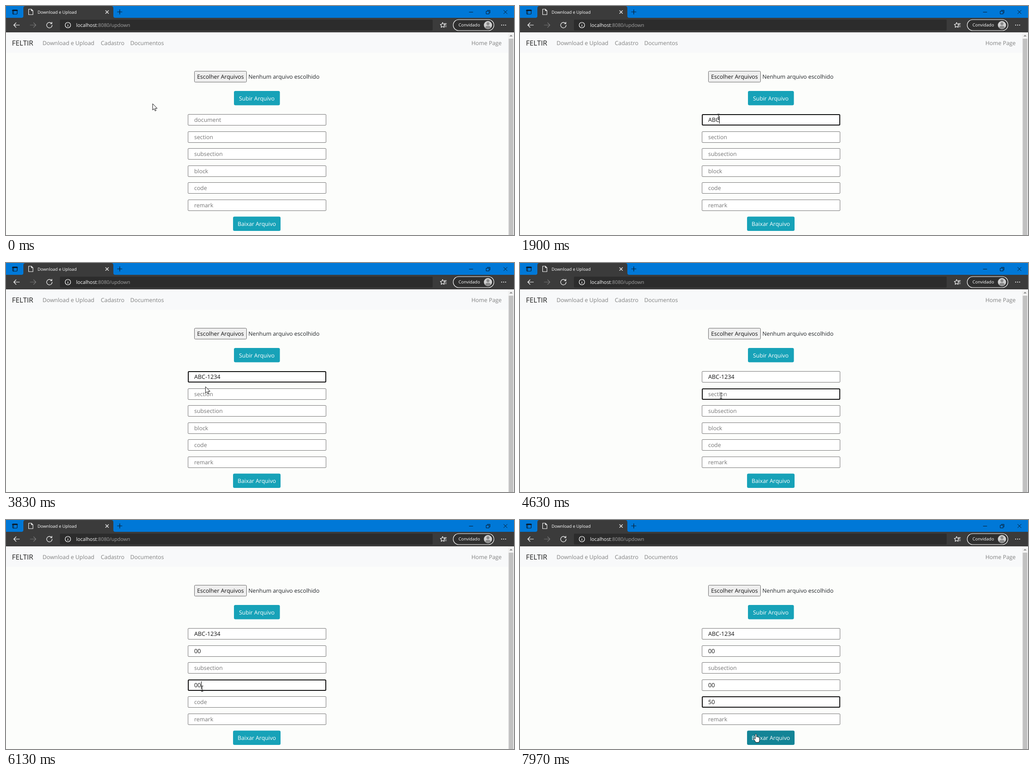
An HTML page for the animation above (8000 ms loop, 1112x504 px).

```html
<!DOCTYPE html>
<html lang="pt">
<head>
<meta charset="utf-8">
<title>Download e Upload</title>
<style>
html, body { margin: 0; width: 100%; height: 100%; overflow: hidden; background: #fcfdfb; }
svg { display: block; }
text { font-family: "Open Sans", "Noto Sans", sans-serif; font-size: 12.36px; text-rendering: geometricPrecision; white-space: pre; }
.line { fill: none; stroke-linecap: round; stroke-linejoin: round; }
.nav { fill: #808181; }
.btn { fill: #17a2b8; }
.btn.hover { fill: #138496; }
.box { fill: #fff; stroke: #767676; }
.box.hover { stroke: #4f4f4f; }
.box.focus { stroke: #101010; stroke-width: 2; }
.hint { fill: #757575; }
.typed { fill: #111; font-size: 12.7px; }
</style>
</head>
<body>
<svg id="stage" width="1112" height="504" viewBox="0 0 1112 504">
  <!-- Title bar -->
  <rect width="1112" height="26" fill="#0078d7"/>
  <rect y="26" width="1112" height="32" fill="#3b3b3b"/>
  <path d="M34 26Q38 26 38 22V5Q38 0 43 0H230Q235 0 235 5V22Q235 26 239 26Z" fill="#3b3b3b"/>
  <g class="line" stroke="#0a1a2a" stroke-width="1.2">
    <rect x="14.5" y="8.5" width="10" height="9.5" rx="1.5"/>
    <path d="M14.5 9.7H24.5" stroke-width="2.6"/>
    <path d="M16.6 11V18" stroke-width="1"/>
    <path d="M244 13H254M249 8V18"/>
    <path d="M1014 13.5H1022M1089.5 9.5L1097 17M1097 9.5L1089.5 17" stroke-width="1"/>
    <path d="M1051.5 11.5H1057.5V17.5H1051.5ZM1053.5 9.5H1059.5V15.5" stroke-width="1"/>
  </g>
  <g class="line" stroke="#fff" stroke-width="1.1">
    <path d="M49.5 7H55.5L59 10.5V19H49.5ZM55.5 7V10.5H59"/>
    <path d="M218 10L224.500 16.500M224.500 10L218 16.500"/>
  </g>
  <text x="69" y="16.7" fill="#fff" style="font-size:9.35px">Download e Upload</text>

  <!-- Address bar -->
  <rect x="118" y="30" width="816" height="24" rx="2" fill="#2c2c2c"/>
  <g class="line" stroke="#fff" stroke-width="1.2">
    <path d="M29.500 42H17M22 37L17 42L22 47"/>
    <path d="M53 42H65.500M60.500 37L65.500 42L60.500 47" stroke="#777"/>
    <path d="M99.500 38.200A6 6 0 1 0 101 42M100.500 35.500V39H97"/>
    <circle cx="135.500" cy="42" r="6"/>
    <path d="M135.500 41.500V45M135.500 39V39.100"/>
    <path d="M959.500 42.500L957.600 44.800L958 48L954.600 46.200L951.500 48L952.100 44.200L949.700 41.600L953 41L954.700 37.300L956.500 41L960 41.400" transform="translate(1 -1)"/>
    <path d="M959.500 38.700H964M961 42H964M960.500 45.500H964"/>
    <rect x="979" y="30" width="89" height="24" rx="12" fill="#2f2f2f"/>
  </g>
  <text x="153.500" y="45.800" fill="#a3a3a3" style="font-size:10.83px"><tspan fill="#fff">localhost</tspan>:8080/updown</text>
  <text x="990.500" y="45.300" fill="#fff" style="font-size:9.45px">Convidado</text>
  <circle cx="1055" cy="42" r="9" fill="#cfcfcf"/>
  <circle cx="1055" cy="39" r="3.300" fill="#8a8a8a"/>
  <path d="M1049 48Q1049 43.500 1055 43.500T1061 48Q1055 52.500 1049 48Z" fill="#8a8a8a"/>
  <g fill="#fff"><circle cx="1085" cy="42" r="1.100"/><circle cx="1089.300" cy="42" r="1.100"/><circle cx="1093.600" cy="42" r="1.100"/></g>

  <!-- Page -->
  <rect y="58" width="1099" height="45" fill="#f8f9fa"/>
  <rect x="1099" y="58" width="13" height="446" fill="#f1f1f1"/>
  <rect x="1100.500" y="72" width="10" height="432" fill="#c1c1c1"/>
  <path d="M1102 67L1105.500 63.500L1109 67Z" fill="#8a8a8a"/>
  <text x="13" y="87" fill="#1a1a1a" style="font-size:15.4px">FELTIR</text>
  <text class="nav" x="80" y="86">Download e Upload</text>
  <text class="nav" x="207.500" y="86">Cadastro</text>
  <text class="nav" x="272" y="86">Documentos</text>
  <text class="nav" x="1085" y="86" text-anchor="end">Home Page</text>

  <rect x="412.500" y="143.500" width="114" height="24" rx="2" fill="#efefef" stroke="#6b6b6b"/>
  <text x="469.500" y="160.200" text-anchor="middle" fill="#111">Escolher Arquivos</text>
  <text x="530.500" y="160.200" fill="#212529">Nenhum arquivo escolhido</text>
  <rect class="btn" x="499" y="187" width="100.500" height="31.500" rx="3.300"/>
  <text x="549" y="207.600" text-anchor="middle" fill="#fff">Subir Arquivo</text>
  <g id="form"></g>
  <rect class="btn" id="save" x="497" y="463.500" width="104" height="31.500" rx="3.300"/>
  <text x="549" y="484.300" text-anchor="middle" fill="#fff">Baixar Arquivo</text>

  <rect id="caret" width="1" height="17" fill="#000"/>
  <g id="pointer" stroke-linejoin="round">
    <path d="M0 0V14L3.200 11L5.400 16L7.600 15L5.500 10.300H9.900Z" fill="#fff" stroke="#111"/>
    <path d="M-2.500 -6H-.6L0 -5.400L.6 -6H2.500M0 -5.400V5.400M-2.500 6H-.6L0 5.400L.6 6H2.500" fill="none" stroke="#222" stroke-width="1.100"/>
    <path d="M-1.600 1.200C-1.600 -.8 1.400 -.8 1.400 1.200V6C1.600 5 4 5 4 6.600C4.200 5.800 6.200 6 6.200 7.400C6.600 6.800 8 7.200 8 8.600V12.500C8 15 6.500 16 6.500 18H-.5C-1 16 -4 12.500 -5.200 10.400C-5.600 8.800 -3.600 8.400 -1.600 10.600Z" fill="#fff" stroke="#111"/>
  </g>
</svg>
<script>
const LOOP = 8000, BLINK = 530, LEFT = 398, TEXT_X = 412;
const labels = ['document', 'section', 'subsection', 'block', 'code', 'remark'];

// Pointer stops: time, x, y
const path = [
  [0, 321, 215], [70, 321, 215], [310, 434.5, 244],
  [3700, 434.5, 244], [3920, 438, 288], [4400, 438, 288], [4570, 440, 292],
  [5200, 440, 292], [5470, 430.400, 365],
  [6070, 430.400, 365], [6300, 424.500, 401],
  [7530, 424.500, 401], [7965, 516.500, 471.500], [LOOP, 516.500, 471.500]
];

// Each entry focuses a field; its keys follow at the given times
const entries = [
  { field: 0, at: 340, text: 'ABC-1234', keys: [1570, 1770, 1900, 2570, 2770, 2970, 3100, 3300] },
  { field: 1, at: 4100, text: '00', keys: [4970, 5100] },
  { field: 3, at: 5630, text: '00', keys: [5870, 6000] },
  { field: 4, at: 6330, text: '50', keys: [7030, 7400] }
];

const $ = id => document.getElementById(id);
const form = $('form'), save = $('save'), caret = $('caret'), pointer = $('pointer');

function add(tag, attrs) {
  const el = document.createElementNS('http://www.w3.org/2000/svg', tag);
  for (const k in attrs) el.setAttribute(k, attrs[k]);
  return form.appendChild(el);
}

const fields = labels.map((label, i) => {
  const y = Math.round(238 + 37.6 * i);
  return {
    label, y,
    box: add('rect', { x: LEFT + .5, y: y + .5, width: 302, height: 24, rx: 1.5 }),
    text: add('text', { x: TEXT_X, y: y + 17.3 })
  };
});

function pointerAt(t) {
  const i = Math.max(1, path.findIndex(p => p[0] > t));
  const [t0, x0, y0] = path[i - 1], [t1, x1, y1] = path[i];
  const u = Math.min(1, Math.max(0, (t - t0) / (t1 - t0)));
  const e = u * u * (3 - 2 * u);
  return [x0 + (x1 - x0) * e, y0 + (y1 - y0) * e];
}

const inField = (f, [x, y]) => x > LEFT && x < 701 && y > f.y && y < f.y + 25;
const onSave = ([x, y]) => x > 497 && x < 601 && y > 463 && y < 495;

function draw(t) {
  const pos = pointerAt(t), before = pointerAt(Math.max(0, t - 25));
  const now = t + 3;
  const values = labels.map(() => '');
  let focus = -1, last = 0;
  for (const e of entries) {
    if (e.at > now) break;
    const count = e.keys.filter(k => k <= now).length;
    values[e.field] = e.text.slice(0, count);
    focus = e.field;
    last = count ? e.keys[count - 1] : e.at;
  }

  fields.forEach((f, i) => {
    const on = i === focus, inset = on ? 1 : .5;
    f.box.setAttribute('class', 'box' + (on ? ' focus' : inField(f, pos) ? ' hover' : ''));
    f.box.setAttribute('x', LEFT + inset);
    f.box.setAttribute('y', f.y + inset);
    f.box.setAttribute('width', 303 - 2 * inset);
    f.box.setAttribute('height', 25 - 2 * inset);
    f.text.setAttribute('class', values[i] ? 'typed' : 'hint');
    f.text.textContent = values[i] || f.label;
  });

  const lit = focus >= 0 && Math.floor((now - last) / BLINK) % 2 === 0;
  caret.style.display = lit ? '' : 'none';
  if (lit) {
    const f = fields[focus];
    const width = values[focus] ? f.text.getComputedTextLength() : 0;
    caret.setAttribute('x', Math.round(TEXT_X + width));
    caret.setAttribute('y', f.y + 4);
  }

  save.setAttribute('class', onSave(pos) ? 'btn hover' : 'btn');
  const kind = onSave(before) ? 2 : fields.some(f => inField(f, before)) ? 1 : 0;
  [...pointer.children].forEach((el, i) => el.style.display = i === kind ? '' : 'none');
  pointer.setAttribute('transform', `translate(${pos[0]} ${pos[1]})`);
}

function tick() {
  draw(performance.now() % LOOP);
  requestAnimationFrame(tick);
}
tick();
</script>
</body>
</html>
```
